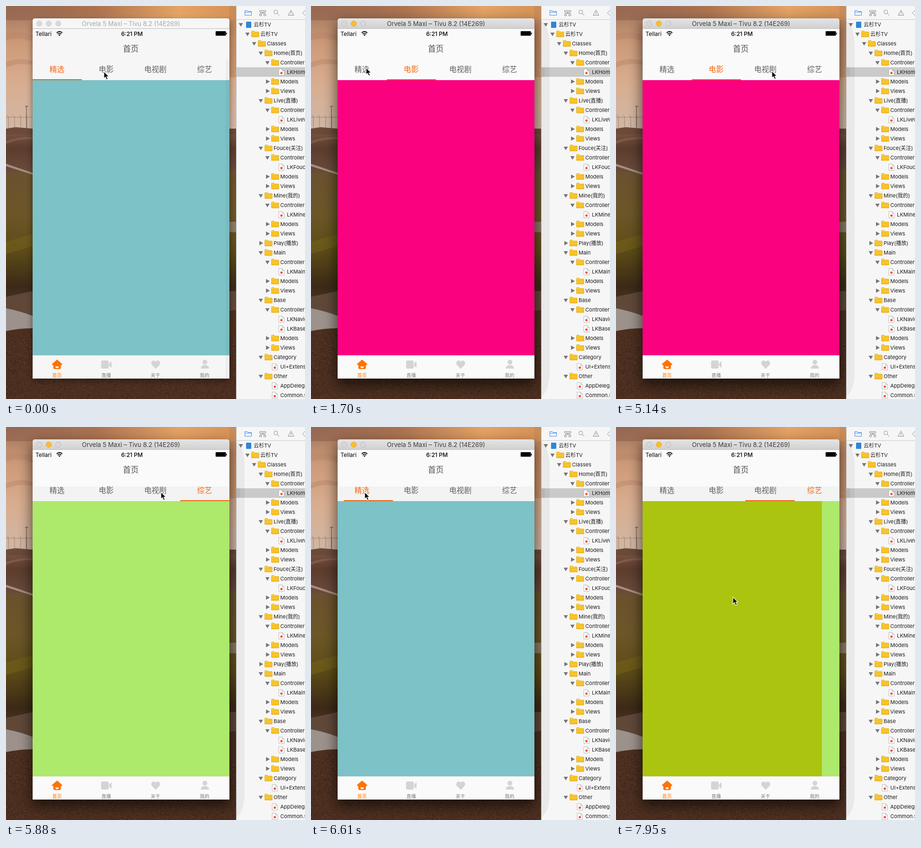
These frames come from a looping animation (629x827 px, 8 s). An HTML page:

```html
<!DOCTYPE html>
<html lang="zh">
<head>
<meta charset="utf-8">
<title>Tab pager</title>
<style>
html, body { margin: 0; width: 100%; height: 100%; overflow: hidden; background: #4a2e20; }
svg { display: block; width: 629px; height: 827px; }
text { font-family: Inter, "Noto Sans CJK SC", "Noto Sans CJK", "Open Sans", sans-serif; }
.mid { text-anchor: middle; }
.row { font-size: 11px; fill: #1c1c1c; }
</style>
</head>
<body>
<svg viewBox="0 0 629 827" xmlns="http://www.w3.org/2000/svg">
  <defs>
    <linearGradient id="sky" x2="0" y2="1">
      <stop offset="0" stop-color="#a0735a"/><stop offset=".3" stop-color="#cc9a79"/>
      <stop offset=".62" stop-color="#d8ad8f"/><stop offset="1" stop-color="#d0b7a6"/>
    </linearGradient>
    <linearGradient id="glow">
      <stop offset="0" stop-color="#8d604c" stop-opacity=".6"/><stop offset=".4" stop-color="#ad7350"/>
      <stop offset=".75" stop-color="#e4a264"/><stop offset="1" stop-color="#d49257"/>
    </linearGradient>
    <linearGradient id="track" x2="0" y2="1">
      <stop offset="0" stop-color="#75503e"/><stop offset=".3" stop-color="#5c3c2d"/><stop offset="1" stop-color="#6e5142"/>
    </linearGradient>
    <linearGradient id="grass" x2="0" y2="1">
      <stop offset="0" stop-color="#6b5130"/><stop offset=".3" stop-color="#6c5628"/>
      <stop offset=".55" stop-color="#5d4c18"/><stop offset=".8" stop-color="#3c2a17"/><stop offset="1" stop-color="#50382a"/>
    </linearGradient>
    <linearGradient id="bar" x2="0" y2="1">
      <stop offset="0" stop-color="#e4e4e4"/><stop offset="1" stop-color="#d0d0d0"/>
    </linearGradient>
    <linearGradient id="gold" x2="0" y2="1">
      <stop offset="0" stop-color="#ffd23c"/><stop offset="1" stop-color="#f6bd1f"/>
    </linearGradient>
    <filter id="soft" x="-30%" y="-30%" width="160%" height="160%"><feGaussianBlur stdDeviation="14"/></filter>
    <filter id="tight" x="-30%" y="-30%" width="160%" height="160%"><feGaussianBlur stdDeviation="7"/></filter>
    <clipPath id="view"><rect x="56" y="156" width="414" height="579"/></clipPath>
    <clipPath id="desk"><rect width="484" height="827"/></clipPath>
  </defs>

  <g clip-path="url(#desk)">
    <rect width="484" height="260" fill="url(#sky)"/>
    <rect width="484" height="30" fill="url(#glow)"/>
    <rect x="470" width="14" height="150" fill="#c4885a" opacity=".6"/>
    <path d="M0 58Q30 50 56 62V74Q28 64 0 72ZM0 118Q30 106 56 116V124Q26 118 0 130Z" fill="#b58066" opacity=".4"/>
    <path d="M0 258L20 255L56 258H484V275H0Z" fill="#6b4a3a"/>
    <path id="fence" fill="none" stroke="#8a6a58" stroke-width=".7"/>
    <path d="M43 210V258M40 211H47" stroke="#5d4335"/>
    <rect y="270" width="484" height="98" fill="url(#track)"/>
    <path d="M0 284Q30 274 56 276V280Q26 279 0 290Z" fill="#8a6656" opacity=".6"/>
    <path d="M0 352L56 346H484V650H0Z" fill="url(#grass)"/>
    <path d="M0 332L56 351V355L0 337Z" fill="#a68d7e"/>
    <path d="M0 496L56 480V505L0 522Z" fill="#76651a" opacity=".5"/>
    <path d="M0 612L56 600H484V690H0Z" fill="#604839"/>
    <path d="M0 680L484 640V827H0Z" fill="#4c2f20"/>
    <path d="M0 636Q30 642 56 652V678Q28 678 0 684Z" fill="#9c918b"/>
    <rect x="470" y="454" width="14" height="22" fill="#a39890" opacity=".6"/>
    <path id="grit" fill="#2f1a11"/>
    <path id="dust" fill="#6d4a36"/>
  </g>

  <rect x="484" width="145" height="827" fill="#f6f6f6"/>
  <path d="M484 28.5H629" stroke="#c9c9c9"/>
  <path d="M502.5 19.5V9.5H507.5L509 11.5H516.5V19.5ZM502.5 13H516.5" fill="none" stroke="#3f8ef0"/>
  <g fill="none" stroke="#8a8a8a">
    <path d="M533.5 9.5H546.5V12.5H533.5ZM540 12.5V17M535.5 17V14.8H544.5V17M533.5 17H537.5V20.5H533.5ZM542.5 17H546.5V20.5H542.5Z"/>
    <circle cx="567.5" cy="12.5" r="4"/><path d="M570.5 15.5L575 20"/>
    <path d="M599.5 8.5L605.5 19.5H593.5ZM599.5 12V16M599.5 17V18"/>
    <path d="M629 9L623.5 14.5L629 20"/>
  </g>
  <rect x="484" y="129" width="145" height="20" fill="#cacaca"/>
  <g id="rows"></g>
  <path d="M484.5 0V827" stroke="#c2c2c2"/>

  <g id="idle" clip-path="url(#desk)">
    <rect x="56" y="32" width="414" height="756" rx="5" opacity=".45" filter="url(#tight)"/>
  </g>
  <g id="raised">
    <g clip-path="url(#desk)"><rect x="54" y="36" width="418" height="762" rx="6" opacity=".6" filter="url(#soft)"/></g>
    <path d="M484 30Q502 44 502 84V768Q502 810 484 822Z" opacity=".055"/>
    <rect x="484" y="129" width="8" height="20" opacity=".05"/>
  </g>

  <path id="head" d="M56 48V31Q56 26 61 26H465Q470 26 470 31V48Z"/>
  <path d="M56 47.5H470" stroke="#bcbcbc"/>
  <g id="lights" stroke-width=".8"></g>
  <text id="title" class="mid" x="263" y="42" font-size="13">Orvela 5 Maxi – Tivu 8.2 (14E269)</text>

  <rect id="body" x="56" y="48" width="414" height="736"/>
  <rect id="strip" x="56" y="125" width="414" height="31" fill="#f3f3f3"/>
  <text x="62" y="62.5" font-size="12">Tellari</text>
  <path d="M106.5 56.5Q112.5 51 118.5 56.5M108.7 59Q112.5 55.7 116.3 59" fill="none" stroke="#000" stroke-width="1.7"/>
  <path d="M110.3 60.6Q112.5 58.8 114.7 60.6L112.5 63Z"/>
  <text class="mid" x="265" y="62.5" font-size="12" font-weight="500">6:21 PM</text>
  <rect x="441" y="53" width="21.5" height="9.5" rx="1.2"/>
  <rect x="463" y="56" width="1.5" height="4"/>
  <text class="mid" x="262.5" y="96" font-size="16.5" fill="#505050">首页</text>
  <g id="tabs" font-size="15.7"></g>

  <g clip-path="url(#view)"><g id="pages"></g></g>
  <rect id="line" y="154" width="103.5" height="2" fill="#ee6212"/>
  <rect id="edge" x="462" y="112" width="8" height="672" opacity=".03"/>

  <path d="M56 735.5H470" stroke="#e8e8e8"/>
  <path d="M107.5 744L118.5 753.5Q118.5 756 115.5 755.5V761Q115.5 764 112.5 764H102.5Q99.5 764 99.5 761V755.5Q96.5 756 96.5 753.5Z" fill="#ff7300"/>
  <path d="M104 758.5H111Q111 762 107.5 762T104 758.5Z" fill="#fff"/>
  <g fill="#d4d4d4">
    <rect x="200" y="746" width="16" height="17" rx="3"/>
    <path d="M217 752L222 747.5V761.5L217 757Z"/>
    <path d="M315 763.5L307 755.5C302.5 750 309.5 742 315 748.5C320.5 742 327.5 750 323 755.5Z"/>
    <circle cx="418.5" cy="749.5" r="5"/>
    <path d="M410 763Q410 755.5 418.5 755.5T427 763Z"/>
  </g>
  <g id="foot" font-size="10"></g>

  <path id="cursor" d="M0 0V14.5L3.3 11.5L5.6 17L8.3 15.8L6 10.6H10.5Z" stroke="#fff" stroke-width="1.1"/>
</svg>
<script>
const NS = "http://www.w3.org/2000/svg";
const $ = id => document.getElementById(id);
const set = (id, key, value) => $(id).setAttribute(key, value);
const show = (id, on) => set(id, "display", on ? "inline" : "none");
function add(parent, tag, attrs, label) {
  const el = document.createElementNS(NS, tag);
  for (const key in attrs) el.setAttribute(key, attrs[key]);
  if (label) el.textContent = label;
  parent.appendChild(el);
  return el;
}

// Desktop texture
let seed = 7;
const rnd = () => (seed = seed * 16807 % 2147483647) / 2147483647;
function specks(n) {
  let d = "";
  for (let i = 0; i < n; i++) {
    d += `M${(rnd() * 484).toFixed(1)} ${(688 + rnd() * 139).toFixed(1)}h1.4v1h-1.4z`;
  }
  return d;
}
set("grit", "d", specks(2600));
set("dust", "d", specks(1600));
let mesh = "M0 234H56";
for (let x = 5; x < 56; x += 13) mesh += `M${x} 258V233l-3 -4`;
set("fence", "d", mesh);

// Project tree: depth, kind (p project, o open, c closed, f file), label
const group = (name, ...files) =>
  ["2o" + name, "3oControllers", ...files.map(f => "4f" + f), "3cModels", "3cViews"];
const tree = [
  "-p云杉TV", "0o云杉TV", "1oClasses",
  ...group("Home(首页)", "LKHomeViewController"),
  ...group("Live(直播)", "LKLiveViewController"),
  ...group("Fouce(关注)", "LKFouceViewController"),
  ...group("Mine(我的)", "LKMineViewController"),
  "2cPlay(播放)",
  ...group("Main", "LKMainViewController"),
  ...group("Base", "LKNavigationController", "LKBaseViewController"),
  "2oCategory", "3fUI+Extension.swift",
  "2oOther", "3fAppDelegate.swift", "3fCommon.swift"
];
const rows = $("rows");
function arrow(x, y, closed) {
  const d = closed ? `M${x - 3} ${y - 4.5}l8 4.5l-8 4.5z` : `M${x - 4.5} ${y - 3}h9l-4.5 7.5z`;
  add(rows, "path", { d, fill: "#757575" });
}
function folder(x, y) {
  add(rows, "path", { d: `M${x} ${y + 6}v-11.5q0 -1 1 -1h4.5l1.5 2h7.5q1 0 1 1v9.5z`, fill: "url(#gold)", stroke: "#d9a010", "stroke-width": .8 });
  add(rows, "path", { d: `M${x} ${y - 2}h15`, stroke: "#e0a91c", "stroke-width": .8 });
}
function sheet(x, y) {
  add(rows, "path", { d: `M${x} ${y - 6.5}h7l4 4v9.5h-11zm7 0v4h4`, fill: "#fff", stroke: "#a9a9a9", "stroke-width": .8 });
  add(rows, "circle", { cx: x + 5.5, cy: y + 2, r: 2.5, fill: "#f0533a" });
}
tree.forEach((item, i) => {
  const kind = item[1], y = 39 + i * 20;
  const x = kind === "p" ? 494 : 508 + item[0] * 14;
  if (kind !== "f") arrow(x, y, kind === "c");
  if (kind === "p") add(rows, "rect", { x: 505, y: y - 6, width: 11, height: 13, rx: 1, fill: "#2e86d8" });
  else if (kind === "f") sheet(x + 10, y);
  else folder(x + 8.5, y);
  add(rows, "text", { x: x + 27, y: y + 4, class: "row" }, item.slice(2));
});

const TAB = 103.5, PAGE = 414;
const label = (id, y, size) => (name, i) =>
  add($(id), "text", { x: 107.2 + i * TAB, y, class: "mid" }, name);
const lights = [70, 90, 110].map(cx => add($("lights"), "circle", { cx, cy: 37, r: 5.6 }));
const tabs = ["精选", "电影", "电视剧", "综艺"].map(label("tabs", 139));
["首页", "直播", "关于", "我的"].map(label("foot", 780.5)).forEach((el, i) =>
  el.setAttribute("fill", i ? "#7c7c7c" : "#ff7300"));
["#7cc2c6", "#fa0180", "#abc40f", "#ade96a"].forEach((fill, i) =>
  add($("pages"), "rect", { x: 56 + i * PAGE, y: 156, width: PAGE + 1, height: 579, fill }));

const ACTIVE = 600, SLIDE = 300, SWIPE = 7171, PERIOD = 349;
const taps = [
  { at: 720, tab: 1 }, { at: 5200, tab: 2 }, { at: 5500, tab: 3 },
  { at: 5900, tab: 2 }, { at: 6140, tab: 1 }, { at: 6379, tab: 0 }
];
// Pointer trips: start, end, x, y
const trips = [
  [640, 940, 209, 137], [1390, 1690, 116, 130], [3190, 3790, 195, 136],
  [4540, 5140, 328, 137], [5290, 5480, 413, 137], [5620, 5870, 326, 137],
  [5930, 6110, 210, 137], [6150, 6350, 113, 137], [6760, SWIPE, 420, 358]
];

const clamp = u => Math.max(0, Math.min(1, u));
const smooth = u => (u = clamp(u), u * u * (3 - 2 * u));
const swing = u => (1 - Math.cos(Math.PI * clamp(u))) / 2;

// Screen refresh rate drops motion to a few steps per second
function refresh(now) {
  const step = now < 5140 ? 150 : 147;
  return 5140 + Math.floor((now - 5140) / step) * step;
}

function position(t) {
  let pos = 0, last = 0;
  for (const { at, tab } of taps) {
    pos += (tab - last) * swing((t - at) / SLIDE);
    last = tab;
  }
  for (let i = 0; i < 3; i++) pos += smooth((t - SWIPE) / PERIOD - i);
  return pos;
}

function tappedTab(t) {
  const done = taps.filter(tap => tap.at <= t);
  return done.length ? done[done.length - 1].tab : 0;
}

function pointer(t) {
  if (t > SWIPE) {
    const p = (t - SWIPE) / PERIOD;
    return [380 - 68.6 * p + 40 * Math.cos(2 * Math.PI * p), 358];
  }
  let x = 206, y = 138;
  for (const [from, to, toX, toY] of trips) {
    const u = smooth((t - from) / (to - from));
    x += (toX - x) * u;
    y += (toY - y) * u;
  }
  return [x, y];
}

function draw(now) {
  const t = refresh(now);
  const active = now >= ACTIVE;
  const pos = position(t);
  const page = t < SWIPE ? tappedTab(t) : pos;
  const chosen = Math.ceil(page);

  show("idle", !active);
  show("raised", active);
  show("edge", !active);
  show("strip", t > taps[1].at);
  set("head", "fill", active ? "url(#bar)" : "#f6f6f6");
  set("title", "fill", active ? "#3c3c3c" : "#a8a8a8");
  set("body", "fill", active ? "#fafafa" : "#f6f6f6");
  lights.forEach((dot, i) => {
    const lit = active && i === 1;
    dot.setAttribute("fill", lit ? "#fdbc2e" : "#d8d8d8");
    dot.setAttribute("stroke", lit ? "#dfa023" : active ? "#b6b6b6" : "#cecece");
  });
  tabs.forEach((tab, i) => tab.setAttribute("fill", i === chosen ? "#f5670f" : "#606060"));
  set("pages", "transform", `translate(${-Math.round(page * PAGE)} 0)`);
  set("line", "x", 56 + pos * TAB);
  set("cursor", "transform", `translate(${pointer(t).map(Math.round)})`);
}

const start = performance.now();
function loop() {
  draw((performance.now() - start) % 8000);
  requestAnimationFrame(loop);
}
loop();
</script>
</body>
</html>
```
